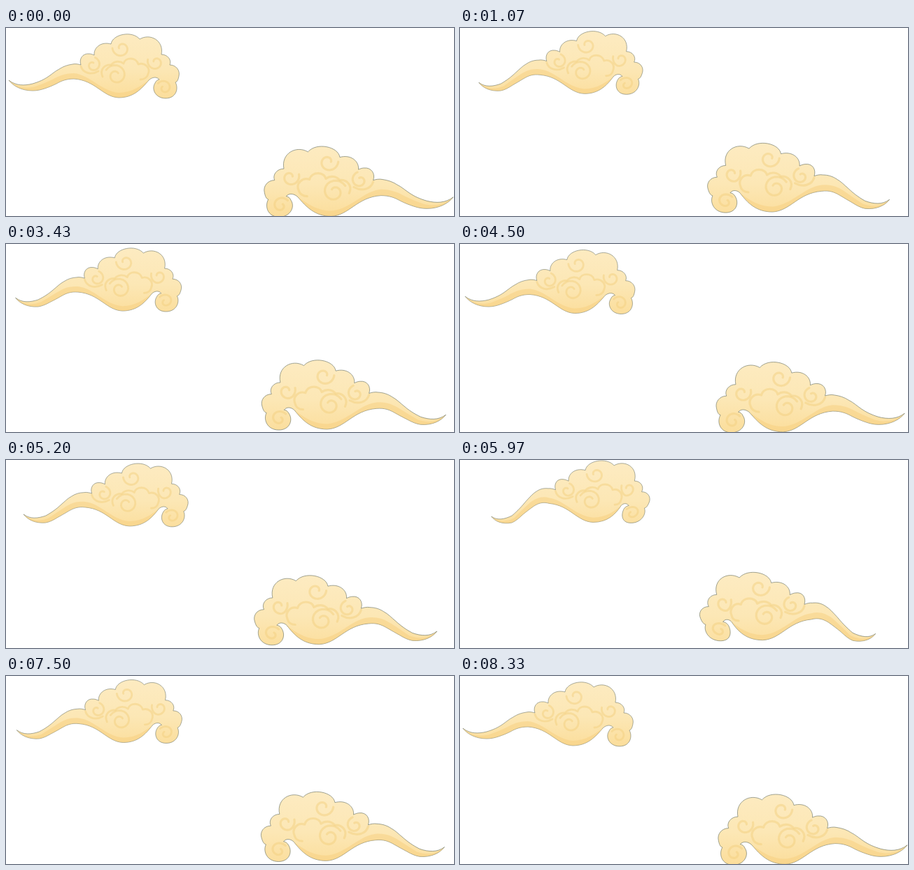
Write an HTML page that moves like this. It is 640 px wide and 270 px high and loops after 8410 ms.

```html
<!DOCTYPE html>
<html lang="en">
<head>
<meta charset="utf-8">
<title>Drifting clouds</title>
<style>
html, body { margin: 0; width: 100%; height: 100%; overflow: hidden; background: #fff; }
svg { display: block; width: 100vw; height: 100vh; }
.line { fill: none; stroke: #f4d183; stroke-opacity: .52; stroke-width: 2.9; stroke-linecap: round; stroke-linejoin: round; }
</style>
</head>
<body>
<svg viewBox="0 0 640 270">
  <defs>
    <linearGradient id="skin" gradientUnits="userSpaceOnUse" x1="0" y1="5" x2="0" y2="102">
      <stop offset="0" stop-color="#fdebc1"/>
      <stop offset=".55" stop-color="#fce7b5"/>
      <stop offset="1" stop-color="#fbdd9a"/>
    </linearGradient>
    <g id="cloud">
      <path id="body" fill="url(#skin)" stroke="#616a5c" stroke-opacity=".72" stroke-width=".75"/>
      <path id="shade" fill="#f7d080" fill-opacity=".5"/>
      <path id="band" class="line"/>
      <path id="swirls" class="line"/>
    </g>
  </defs>
  <use href="#cloud"/>
  <use href="#cloud" transform="translate(643.4 160.3) scale(-1.11 1.1)"/>
</svg>
<script>
const LOOP = 8410, CYCLE = 60;
const $ = id => document.getElementById(id);
const clamp = v => Math.max(0, Math.min(1, v));

const LOWER = 'C193 88 182 100 161 100 C138 99 128 75 97 73 C86 73 79 76 72 80' +
  'C66 83 61 85 55 87 C49 89 44 90 38 90 C22 90 10 83 4 75 Z';

// spiral from the outside in; angles in turns
function spiral(cx, cy, r, start, turns, dir = 1) {
  let d = '';
  for (let i = 0; i <= 28; i++) {
    const k = i / 28, a = 2 * Math.PI * (start + dir * turns * k), q = r * (1 - .72 * k);
    d += (i ? 'L' : 'M') + (cx + q * Math.cos(a)) + ' ' + (cy + q * Math.sin(a));
  }
  return d;
}

const shapes = {
  body: 'M4 75 C14 83 26 83 38 80 C48 77 54 74 60 70 C66 66 70 62 76 59 C82 55 88 53 95 52' +
    'C99 51 104 52 107 53' +
    'C104 45 109 36 119 37 C121 37 124 38 126 39 C125 28 136 19 150 23' +
    'C152 9 180 3 191 16 C206 7 226 18 222 38 C231 38 237 46 234 53' +
    'C243 53 249 61 247 69 C246 74 245 77 242 78 C247 87 243 101 228 101' +
    'C214 101 207 88 213 79 C214 76 217 74 219 74 C215 69 208 71 204 75' + LOWER,
  shade: 'M4 75 C18 87 30 87 42 84 C50 81 58 78 66 74 C75 69 84 65 97 65' +
    'C120 67 136 91 161 93 C180 93 192 83 204 75' + LOWER,
  band: 'M138 70 C133 59 142 52 150 53 C155 47 163 47 168 51 C170 42 186 41 189 52' +
    'C198 49 207 57 203 66 C202 71 197 74 192 74 M107 55 C110 65 122 68 132 62',
  swirls: spiral(157, 68, 16, -.42, 1.3) + spiral(124, 53, 11, -.2, 1) +
    spiral(165, 29, 13, .5, 1, -1) + spiral(214, 49, 12, .55, 1, -1) +
    spiral(226, 86, 11, -.4, 1)
};

// step in the cycle and horizontal drift
const drift = [[0, 0], [4, 3], [15, 18.7], [25, 33], [28, 34], [36, 22.5], [43, 13.2], [51, 3.4], [57, 0], [60, 0]];

function driftAt(p) {
  const n = drift.length;
  let i = 0;
  while (i < n - 2 && p >= drift[i + 1][0]) i++;
  const slope = j => j <= 0 || j >= n - 2 ? 0 :
    (drift[j + 1][1] - drift[j - 1][1]) / (drift[j + 1][0] - drift[j - 1][0]);
  const [x0, y0] = drift[i], [x1, y1] = drift[i + 1];
  const h = x1 - x0, k = (p - x0) / h, m = 1 - k;
  return y0 * m * m * (1 + 2 * k) + y1 * k * k * (3 - 2 * k) +
    h * k * m * (slope(i) * m - slope(i + 1) * k);
}

// bends the tail into a steeper wave and folds the right curl inward
function bend(x, y, w, dx, dy) {
  const tail = clamp((97 - x) / 93), curl = clamp((x - 198) / 14);
  const bx = 8 * tail * tail - 4 * clamp((x - 80) / 30) - curl * .00128 * y * y;
  const by = 17 * tail - 8 * Math.sin(Math.PI * clamp(tail / .6)) +
    3 * clamp(1 - y / 100) * clamp((x - 100) / 25) +
    2 * curl * clamp((95 - y) / 30) * clamp((y - 25) / 30);
  return (x + dx + w * bx).toFixed(2) + ' ' + (y + dy + w * by).toFixed(2);
}

function draw(t) {
  const step = t < 100 ? 0 : Math.min(119, 1 + Math.floor((t - 100) / 69.8 + .25));
  const p = step % CYCLE;
  const w = (1 - Math.cos(2 * Math.PI * p / CYCLE)) / 2 * 1.05;
  const dx = driftAt(p), dy = -10.8 * w;
  for (const id in shapes)
    $(id).setAttribute('d', shapes[id].replace(/(-?[\d.]+) (-?[\d.]+)/g,
      (_, x, y) => bend(+x, +y, w, dx, dy)));
}

const begin = performance.now();
function tick() {
  draw((performance.now() - begin) % LOOP);
  requestAnimationFrame(tick);
}
tick();
</script>
</body>
</html>
```
